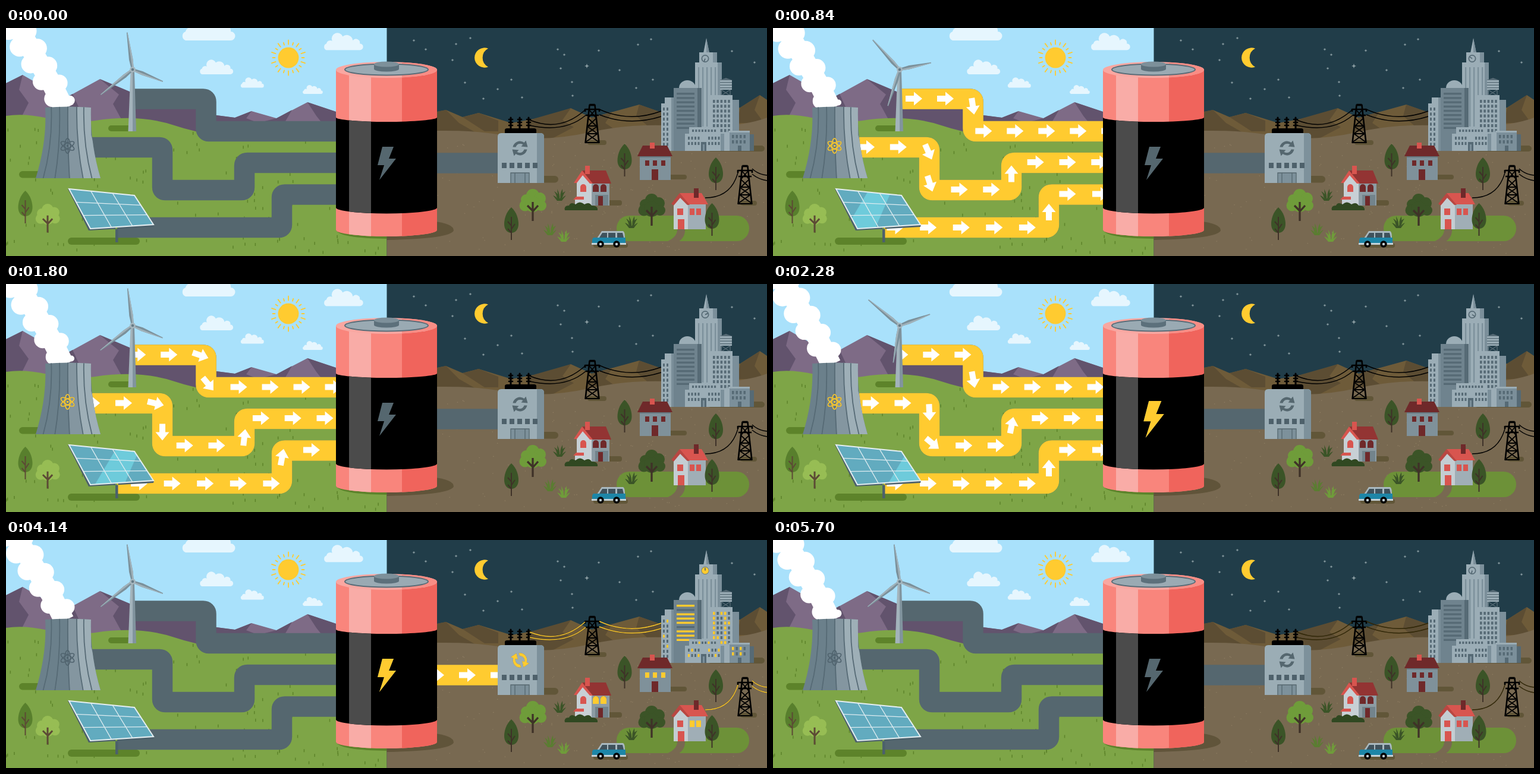
An HTML page that plays this animation: 1280x384 px, repeating every 5.76 s.

```html
<!DOCTYPE html>
<html lang="en">
<head>
<meta charset="utf-8">
<title>Energy storage</title>
<style>
html, body { margin: 0; width: 100%; height: 100%; overflow: hidden; background: #213d49; }
svg { display: block; width: 1280px; height: 384px; }
.pipe { fill: none; stroke: #55676f; stroke-width: 34.5; }
.lit { stroke: #ffcb30; }
.wire { fill: none; stroke: #000; stroke-width: 1.4; }
.wire.lit { stroke: #ffcb30; }
.line { fill: none; stroke: #566a75; stroke-width: 1.8; }
</style>
</head>
<body>
<svg viewBox="0 0 1280 384">
<defs>
  <path id="arrow" fill="#fff" d="M-14-5H0V-11.500L14 0 0 11.500V5H-14Z"/>
  <path id="cloud" fill="#e6f6fe" d="M8 26A8 8 0 0 1 8 11 9 9 0 0 1 21 5 13 13 0 0 1 45-5 14 14 0 0 1 68 4 9 9 0 0 1 84 11 7.5 7.5 0 0 1 84 26Z"/>
  <path id="bolt" d="M-7-28H12L4-8H16L-12 28-4 3H-15Z"/>
  <g id="atom" fill="none" stroke-width="1.6">
    <ellipse rx="12.5" ry="4.6" transform="rotate(30)"/><ellipse rx="12.5" ry="4.6" transform="rotate(90)"/><ellipse rx="12.5" ry="4.6" transform="rotate(150)"/>
    <circle r="1"/>
  </g>
  <g id="half"><path d="M-12-2A12 12 0 0 1 7-9.5L10-13 13-2 2-3 5-6.3A8 8 0 0 0-7-2Z"/></g>
  <g id="swirl"><use href="#half"/><use href="#half" transform="rotate(180)"/></g>
  <g id="pylon" fill="none" stroke="#000">
    <path stroke-width="2.6" d="M-11.500 66-4.500 2H4.500L11.500 66M-12 9H12M-11 19H11M-4.500 1H4.500M-12 8V13M12 8V13"/>
    <path stroke-width="1.800" d="M-5 10 7 24-8 38 9 50-11 64M5 10-7 24 8 38-9 50 11 64M-8 37H8M-10 50H10M-12 65H12"/>
  </g>
  <g id="tuft"><path d="M-9-10Q-2-7-1 2H1Q2-7 10-10 5-3 4 5H-4Q-4-3-9-10ZM-4-14Q1-5 0 4H2Q0-6 5-14 6-2 3 5H-2ZM-11-3Q-4-1-3 5H3Q5-1 11-3 6 3 4 6H-4Z"/></g>
  <clipPath id="towerClip"><path d="M66 134Q104 131 143 134 141 192 159 253H50Q69 192 66 134Z"/></clipPath>
  <clipPath id="panelClip"><path d="M106 271 216 282 248 331 142 338Z"/></clipPath>
  <clipPath id="bodyClip"><path d="M555 71V340A85 11 0 0 0 725 340V71Z"/></clipPath>
  <clipPath id="bandClip"><path d="M555 150.500A85 7.500 0 0 0 725 150.500V302.500A85 10 0 0 1 555 302.500Z"/></clipPath>
  <clipPath id="c0"><path d="M213 90H600V200H213Z"/></clipPath>
  <clipPath id="c1"><path d="M100 170H600V300H100Z"/></clipPath>
  <clipPath id="c2"><path d="M187 250H600V370H187Z"/></clipPath>
  <clipPath id="c3"><path d="M700 200H827V250H700Z"/></clipPath>
</defs>

<!-- day -->
<path fill="#a9e1fb" d="M0 0H641V384H0Z"/>
<use href="#cloud" x="294" y="-5"/>
<use href="#cloud" transform="translate(533 18) scale(.74)"/>
<use href="#cloud" transform="translate(324.500 61.500) scale(.63)"/>
<use href="#cloud" transform="translate(393.500 89) scale(.44)"/>
<use href="#cloud" transform="translate(498 101) scale(.38)"/>
<circle cx="475" cy="50" r="17.500" fill="#ffcb30"/>
<g id="rays" stroke="#ffcb30" stroke-width="1.8" stroke-linecap="round"></g>
<path fill="#7e6b86" d="M0 93 28 79 98 119 158 86 210 108 260 116 319 134 354 147 385 151 413 140 455 152 507 125 555 141V220H0Z"/>
<path fill="#62536d" d="M0 93 28 79 22 104 38 126 26 150H0ZM98 119 112 111 124 137 136 160H80ZM158 86 210 108 260 116 319 134 354 147 385 151 400 192H215L180 128 190 112ZM385 151 413 140 404 152 425 160H370ZM455 152 481 138 470 157H435ZM507 125 555 141V158H530L522 148Z"/>
<path fill="#7ea547" d="M0 148Q30 143 70 152 110 162 150 156 215 146 270 160 330 180 400 190L555 172H641V384H0Z"/>
<g id="ticks" fill="#5d832a"></g>
<g fill="#5d832a">
  <rect x="22" y="241" width="60" height="11.500" rx="5.700"/>
  <rect x="172" y="164" width="46" height="10" rx="5"/>
  <rect x="104" y="353" width="121" height="12" rx="6"/>
</g>

<!-- night -->
<path fill="#213d49" d="M640.500 0H1280V384H640.500Z"/>
<g id="stars" fill="#91a3a8"></g>
<path fill="#ffcb30" d="M811 34.500A16.700 16.700 0 1 0 811 65.500 17.500 17.500 0 0 1 811 34.500Z"/>
<path fill="#6e5b39" d="M700 146 740 138 768 150 795 143 850 160 905 150 950 135 985 151 1065 129 1105 143 1235 134 1268 113 1280 121V220H700Z"/>
<path fill="#5c4d33" d="M700 146 740 138 762 160 790 176H700ZM768 150 795 143 828 156V174H805ZM880 155 950 135 936 155 955 167 915 188H880ZM985 151 1020 141 1008 160 1030 175H975ZM1065 129 1105 143V170H1085L1060 148ZM1235 134 1268 113 1259 138 1275 160H1230Z"/>
<path fill="#786951" d="M640.500 173H725Q780 172 827 179 900 194 980 176 1050 160 1130 165 1230 170 1280 151V384H640.500Z"/>
<g id="dots" fill="#8e7e62"></g>
<path fill="#5c832b" d="M555 340Q560 354 640.500 355V325H555Z"/>
<path fill="#60543a" d="M640.500 325H715Q753 329 753 341 748 355 640.500 357Z"/>
<g fill="#615638">
  <rect x="880" y="249" width="49" height="11.500" rx="5.700"/>
  <rect x="978" y="189" width="32" height="8" rx="4"/>
  <rect x="1100" y="247" width="45" height="8" rx="4"/>
  <rect x="1000" y="290" width="36" height="9" rx="4"/>
  <rect x="1235" y="291" width="28" height="8" rx="4"/>
  <rect x="1180" y="198" width="96" height="10" rx="5"/>
</g>
<rect x="1027" y="316" width="223" height="43" rx="21" fill="#6d9138"/>
<path fill="#786951" d="M1129 338H1142Q1143 352 1131 360H1111Q1130 352 1129 338Z"/>

<!-- pipes -->
<g id="pipes"></g>

<!-- cooling tower -->
<g id="smoke" fill="#fff"></g>
<g clip-path="url(#towerClip)">
  <path fill="#6b808b" d="M40 120H170V260H40Z"/>
  <path fill="#8496a0" d="M104 130H119Q118 195 129 255H107Z"/>
  <path fill="#9eafb7" d="M119 130H143V180L165 255H129Q118 195 119 130Z"/>
  <path class="line" d="M76 130Q79 195 62 255M90 130Q92 195 82 255M104 130Q103 195 107 255M119 130Q118 195 130 255M131 130Q129 195 145 255"/>
</g>
<use href="#atom" x="103.500" y="198.500" stroke="#50636e"/>
<use href="#atom" x="103.500" y="198.500" stroke="#ffcb30" data-on="180,420,2640,2880"/>

<!-- turbine -->
<path fill="#a3b3bb" d="M209.500 74H213V174H205.500Z"/>
<path fill="#81949e" d="M213 74H216L219 174H213Z"/>
<g id="blades"></g>
<circle cx="213" cy="70" r="4.800" fill="#a6b6be"/><circle cx="213" cy="70" r="2.300" fill="#667b86"/>

<!-- solar panel -->
<path fill="#4c606b" d="M184 333H188.500V361H184ZM104 271 139 341 248 335 249 331 142 338 108 271Z"/>
<path fill="#62abbf" d="M106 271 216 282 248 331 142 338Z"/>
<path id="glint" clip-path="url(#panelClip)" fill="#6ecbdb"/>
<path id="cells" fill="none" stroke="#dcebf0" stroke-width="1.300"/>
<path fill="none" stroke="#e4eef1" stroke-width="2" d="M106 271 216 282 248 331 142 338Z"/>

<!-- battery -->
<g clip-path="url(#bodyClip)">
  <path fill="#f9857c" d="M555 60H725V360H555Z"/>
  <path fill="#f9aca7" d="M577 60H614V360H577Z"/>
  <path fill="#f0645c" d="M666 60H725V360H666Z"/>
</g>
<g clip-path="url(#bandClip)">
  <path d="M555 140H725V320H555Z"/><path fill="#4b4b4b" d="M577 140H614V320H577Z"/>
</g>
<ellipse cx="640" cy="70.500" rx="85" ry="13.500" fill="#f9a7a1"/>
<path fill="#f98d85" d="M666 57.700A85 13.500 0 0 1 725 70.500 85 13.500 0 0 1 666 83.300Z"/>
<ellipse cx="640" cy="70" rx="70" ry="9.500" fill="#9aaab3" stroke="#5b6d78" stroke-width="2"/>
<path fill="#5c707b" d="M619 61V69A21 4.500 0 0 0 661 69V61Z"/>
<ellipse cx="640" cy="61" rx="21" ry="4.500" fill="#7d909a"/>
<g id="boltBox"><use href="#bolt" fill="#55676f"/><use href="#bolt" fill="#ffcb30" data-on="2100,2280,5460,5640"/></g>

<!-- converter -->
<path fill="#9badb5" d="M833 177H899Q905 177 905 183V261H827V183Q827 177 833 177Z"/>
<path fill="#7d919b" d="M893 177H899Q905 177 905 183V261H893ZM849 244H880V261H849Z"/>
<path stroke="#55676f" stroke-width="1.300" fill="none" d="M849 261V244H880V261M856 244V261M873 244V261"/>
<path fill="#4e616b" d="M834 227H842V236H834ZM847 227H855V236H847ZM860 227H868V236H860ZM873 227H881V236H873ZM886 227H894V236H886Z"/>
<path d="M839 177V172Q839 169 843 169H888Q892 169 892 172V177Z"/>
<g id="poles" stroke="#000" stroke-linecap="round"></g>
<g id="swirlBox"><use href="#swirl" fill="#55676f"/><use href="#swirl" fill="#ffcb30" data-on="2580,2760,5460,5640"/></g>

<g id="city"></g>
<use href="#pylon" x="986" y="128"/>
<use href="#pylon" x="1243" y="231"/>
<g id="wires"></g>
<g id="village"></g>

<!-- car -->
<rect x="988" y="362" width="58" height="8" rx="4" fill="#615638"/>
<path fill="#a9b9c0" d="M1002 342H1038Q1041 343 1041 354H994Z"/>
<path fill="#3f525c" d="M1003 345H1011V353H998ZM1013 345H1025V353H1013ZM1028 345H1037L1039 353H1028Z"/>
<path fill="#1d86a7" d="M988 353H1042V365H986V356Z"/>
<path fill="#c4d2d8" d="M985 362H1043V365H985Z"/>
<g stroke="#000" stroke-width="3.500" fill="#bfcbd0"><circle cx="1000" cy="364" r="4"/><circle cx="1027" cy="364" r="4"/></g>
</svg>

<script>
const LOOP = 5760, STEP = 60;
const $ = id => document.getElementById(id);
const clamp = (v, a, b) => Math.min(b, Math.max(a, v));
const ramp = (t, a, b) => clamp((t - a) / (b - a), 0, 1);
const mix = (a, b, k) => a.map((v, i) => v + (b[i] - v) * k);
const rep = (n, f) => Array.from({ length: n }, (_, i) => f(i)).join('');
const poly = (fill, d) => `<path fill="${fill}" d="${d}"/>`;
const box = (x, y, w, h, fill, more = '') => `<rect x="${x}" y="${y}" width="${w}" height="${h}" fill="${fill}" ${more}/>`;
const until = on => `data-on="${on},${on + 180},5460,5640"`;
const win = (x, y, w, h, off, on) =>
  box(x, y, w, h, off) + (on ? box(x, y, w, h, '#ffcb30', until(on)) : '');

let seed = 7;
const rnd = () => (seed = seed * 16807 % 2147483647) / 2147483647;

// scenery
$('rays').innerHTML = rep(20, i =>
  `<path d="M0-22.500V${i % 2 ? -26.5 : -29.5}" transform="translate(475 50) rotate(${i * 18})"/>`);
$('ticks').innerHTML = rep(150, () => {
  const x = rnd() * 630, y = 168 + rnd() * 210;
  return `<rect x="${x.toFixed(1)}" y="${y.toFixed(1)}" width="1.5" height="5"/>`;
});
$('dots').innerHTML = rep(230, () =>
  `<circle cx="${(645 + rnd() * 632).toFixed(1)}" cy="${(192 + rnd() * 188).toFixed(1)}" r=".8"/>`);
$('stars').innerHTML = [686,21, 706,36, 757,27, 781,17, 751,54, 772,92, 803,119, 827,103, 850,87, 868,117,
  928,36, 939,45, 933,68, 952,91, 953,114, 977,64, 997,38, 1032,71, 1063,28, 1085,19, 1060,101, 1088,87,
  1221,39, 1259,58].reduce((s, v, i, a) => {
    if (i % 2) return s;
    const r = v === 977 ? 4 : 2.6;
    return s + `<path d="M0-1 .25-.25 1 0 .25.25 0 1-.25.25-1 0-.25-.25Z" transform="translate(${v} ${a[i + 1]}) scale(${r})"/>`;
  }, '');
$('poles').innerHTML = [849, 864, 879].map(x =>
  `<path stroke-width="3" d="M${x} 151V170"/>` +
  rep(3, i => `<path stroke-width="2.6" d="M${x - 3} ${154 + i * 5}h6"/>`)).join('');

const tl = [106, 271], tr = [216, 282], br = [248, 331], bl = [142, 338];
$('cells').setAttribute('d', rep(2, i => {
  const k = (i + 1) / 3;
  return `M${mix(tl, tr, k)}L${mix(bl, br, k)}M${mix(tl, bl, k)}L${mix(tr, br, k)}`;
}));

// pipes: arrow track, visible body (tighter corners), arrow offset s at time `at`, speed v
const pipes = [
  { track: 'M200 119H319.5Q336.5 119 336.5 136V156.5Q336.5 173.5 353.5 173.5H620',
    body: 'M213 119.5H331.5Q336.5 119.5 336.5 124.5V169Q336.5 174 341.5 174H620', gap: 53, s: 37, at: 840, v: .094 },
  { track: 'M120 200.5H246Q263 200.5 263 217.500V255Q263 272 280 272H384Q401 272 401 255V243Q401 226 418 226H620',
    body: 'M130 201H258Q263 201 263 206V268Q263 273 268 273H396Q401 273 401 268V232Q401 227 406 227H620', gap: 53.8, s: 37, at: 840, v: .0427 },
  { track: 'M200 336H447Q464 336 464 319V296.500Q464 279.5 481 279.5H620',
    body: 'M187 336H459Q464 336 464 331V285.5Q464 280.5 469 280.5H620', gap: 55.6, s: 5.5, at: 840, v: 55.6 / 720 },
  { track: 'M690 227.5H860', body: 'M690 227.5H830', gap: 53, s: 33, at: 3120, v: 53 / 510, right: true }
];
$('pipes').innerHTML = pipes.map((p, i) => {
  const on = p.right ? '2460,2640,5460,5640' : '180,420,2640,2880';
  return `<path class="pipe" d="${p.body}"/><g data-on="${on}"><path class="pipe lit" d="${p.body}"/>` +
    `<path id="track${i}" fill="none" d="${p.track}"/><g id="arrows${i}" clip-path="url(#c${i})">` +
    rep(14, () => '<use href="#arrow"/>') + '</g></g>';
}).join('');
pipes.forEach((p, i) => {
  p.path = $('track' + i);
  p.len = p.path.getTotalLength();
  p.arrows = [...$('arrows' + i).children];
});

// wires
const wire = (d, on) => `<path class="wire" d="${d}"/><path class="wire lit" d="${d}" data-on="${on},${on + 180},5460,5760"/>`;
$('wires').innerHTML =
  wire('M881 155Q932 176 974 138M881 164Q940 177 975 147M998 137Q1048 160 1102 140M998 146Q1048 166 1102 149', 2760) +
  wire('M1176 286Q1219 286 1231 244M1255 237Q1266 247 1280 248M1255 246Q1266 255 1280 257', 3180);

// city
const dk = '#566a75', mid = '#7b8f9a', lt = '#9badb6';
const grid = (x, y, cols, rows, dx, dy, w, h, pick) => rep(cols * rows, i =>
  win(x + i % cols * dx, y + (i / cols | 0) * dy, w, h, dk, pick(i)));
$('city').innerHTML =
  poly(lt, 'M1178 17 1183 42H1173Z') + poly(mid, 'M1178 17 1183 42H1178Z') +
  box(1166, 41, 27, 24, lt) + box(1189, 41, 7, 24, mid) +
  box(1159, 58, 38, 149, lt) + box(1197, 58, 7, 149, mid) +
  rep(5, i => box(1164 + i * 7, 66, 2.2, 100, mid)) +
  `<circle cx="1176" cy="51.500" r="6.500" fill="${dk}"/><circle cx="1176" cy="51.500" r="4.800" fill="${lt}"/>` +
  `<circle cx="1176" cy="51.500" r="5.800" fill="#ffcb30" ${until(3480)}/>` +
  `<path id="hand" stroke="#465a65" stroke-width="1.500" d="M1176 51.500V46.700"/>` +
  `<path fill="none" stroke="${dk}" stroke-width="1.400" d="M1203 103V114M1218 103V114M1203 114 1218 104M1218 114 1203 104"/>` +
  box(1201, 88, 20, 16, lt) + poly(dk, 'M1200 88 1211 84 1222 88Z') + rep(3, i => box(1201, 91 + i * 4.5, 20, 1.3, dk)) +
  box(1102, 127, 24, 80, lt) + box(1108, 117, 17, 12, lt) + box(1119, 117, 6, 90, mid) +
  grid(1105, 134, 2, 8, 6, 8.5, 3, 5, i => i % 5 === 1 && 3600) +
  poly(lt, 'M1132 101A14 13 0 0 1 1160 101Z') +
  box(1123, 101, 40, 106, '#6f838e') + box(1163, 101, 7, 106, dk) +
  rep(9, i => win(1128, 109 + i * 7.2, 30, 3.4, dk, i % 4 !== 1 && 3360 + i * 60)) +
  box(1184, 113, 38, 94, lt) + box(1222, 121, 11, 86, mid) +
  grid(1189, 121, 5, 7, 6.3, 8.2, 3.6, 5, i => (i * 7 % 5 < 2 || i % 6 === 2) && 3420 + i * 15) +
  box(1142, 178, 66, 29, lt) + box(1149, 167, 50, 14, lt) + box(1202, 178, 6, 29, mid) +
  grid(1147, 183, 4, 2, 5.5, 9, 3, 5, i => i % 3 === 1 && 3660) +
  grid(1181, 183, 4, 2, 5.5, 9, 3, 5, i => i % 3 === 0 && 3780) +
  grid(1154, 171, 8, 1, 5.3, 8, 3, 4, i => i % 3 === 2 && 3540) +
  box(1169, 192, 9, 15, dk) + box(1172, 196, 3, 11, mid) +
  box(1217, 174, 34, 33, mid) + box(1251, 179, 7, 28, dk) + box(1215, 173, 36, 3, lt) +
  grid(1221, 180, 4, 2, 6.5, 9, 3.5, 5.5, i => i === 3 ? 4500 : i % 2 === 0 && 3720) + box(1231, 198, 6, 9, dk);

// trees and houses
const night = '#3b5427', bark = '#3f3228';
const pine = (x, y, leaf, trunk) => `<g transform="translate(${x} ${y})">` +
  poly(leaf, 'M0 0C9 8 12 20 12 28 12 37 7 43 0 43S-12 37-12 28C-12 20-9 8 0 0Z') +
  `<path fill="none" stroke="${trunk}" stroke-width="2" d="M0 16V55M0 31-6 24M0 37 6 28M0 43-6 36"/></g>`;
const round = (x, y, s, leaf, trunk) => `<g transform="translate(${x} ${y}) scale(${s})"><g fill="${leaf}">` +
  '<circle cy="11" r="11"/><circle cx="-11" cy="18" r="9"/><circle cx="12" cy="16" r="10"/><circle cx="-13" cy="28" r="9.500"/>' +
  '<circle cx="14" cy="28" r="9"/><circle cy="26" r="13"/></g>' +
  `<path fill="none" stroke="${trunk}" stroke-width="3.300" d="M0 22V54M0 37-9 28M0 38 9 28"/></g>`;
const tuft = (x, y, c) => `<use href="#tuft" x="${x}" y="${y}" fill="${c}"/>`;
const arch = (x, y, off, on) => {
  const d = `M${x} ${y + 13}v-8a5 5 0 0 1 10 0v8Z`;
  return poly(off, d) + (on ? `<path fill="#ffcb30" d="${d}" ${until(on)}/>` : '');
};
const red = '#d8554f', dim = '#6f292a';
$('village').innerHTML =
  pine(32.5, 274, '#587f2d', '#5c4a35') + round(70, 296, .9, '#97bd54', '#5c4a35') +
  pine(1040.5, 195, night, bark) + pine(1194, 218, night, bark) +
  // brick house
  box(1066, 214, 52, 42, '#7f919a') + box(1066, 215, 52, 3, '#66767e') +
  poly(dim, 'M1071 198H1112L1121 216H1062Z') + box(1083, 193, 8, 10, red) +
  [1075, 1088, 1102].map((x, i) => win(x, 223, 7, 9, dim, 3240 + i * 60)).join('') +
  box(1086, 238, 11, 18, dim) +
  // arched house
  box(984, 260, 31, 39, '#8d9ca4') + poly('#c8d0d5', 'M960 299V260L970 247 985 262V299Z') +
  poly('#933433', 'M969 240H1009L1018 262H985Z') + poly(red, 'M969 240 955 261H960L970 248 982 262H987Z') +
  box(974, 232, 8, 14, red) + arch(966, 263, red) + arch(987, 263, dim, 3240) + arch(1000, 263, dim, 3300) +
  box(991, 281, 22, 18, '#73848c') + box(996, 283, 8, 16, dim) +
  box(957, 288, 14, 11, '#c8d0d5') + poly(red, 'M959 284H972V289H954Z') +
  poly('#304821', 'M940 307Q938 299 947 299 950 292 958 297 965 290 973 297 981 292 985 299 996 299 995 307Z') +
  round(886, 271, 1, '#6f9c3a', bark) + round(1086, 279, 1, night, bark) +
  // cottage
  box(1145, 296, 32, 43, '#a0aeb6') + poly('#c4cdd2', 'M1123 339V297L1134 285 1147 299V339Z') +
  poly(red, 'M1133 278H1170L1181 297H1147Z') + poly('#b94742', 'M1133 278 1119 296 1123 299 1134 286 1146 298H1150Z') +
  box(1157, 270, 8, 16, dim) + win(1129, 304, 10, 11, red) +
  win(1150, 304, 8, 11, red, 3240) + win(1161, 304, 8, 11, red, 3300) + box(1130, 322, 11, 17, red) +
  pine(850, 302, night, bark) + pine(1187.500, 295, night, bark) +
  tuft(931, 285, night) + tuft(1052, 331, night) + tuft(915, 343, '#5a7d31') + tuft(938, 354, '#6f9c3a');

// moving parts
const fades = [...document.querySelectorAll('[data-on]')].map(el => [el, el.dataset.on.split(',').map(Number)]);

$('blades').innerHTML = rep(3, () => '<g><path fill="#7b909a"/><path fill="#a1b2ba"/></g>');
const blades = [...$('blades').children];
function turbine(t) {
  const spin = 360 * ramp(t, 304, 2540);
  blades.forEach((b, i) => {
    const a = spin - 8.5 + i * 120, l = 62 - 8 * Math.sin(a * Math.PI / 180);
    b.setAttribute('transform', `translate(213 70) rotate(${a})`);
    b.children[0].setAttribute('d', `M-2 0-3.500-17-.8${-l}H.8L3-17 2 0Z`);
    b.children[1].setAttribute('d', `M0 0V${-l}H.8L3-17 2 0Z`);
  });
}

$('smoke').innerHTML = '<path stroke="#fff" stroke-width="34" fill="none" d="M98 136 78 96 47 44 8-20"/>' + rep(14, () => '<circle/>');
const puffs = [...$('smoke').querySelectorAll('circle')];
function smoke(t) {
  const ph = t / 960 % 1 + .2;
  puffs.forEach((c, i) => {
    const side = i % 2 ? -1 : 1, d = ((i >> 1) + (ph + (i % 2) * .5) % 1) * 34 - 2;
    const grow = clamp(d / 18 + .35, .3, 1), off = side * 12;
    c.setAttribute('cx', 100 - .54 * d + off * .86);
    c.setAttribute('cy', 132 - .86 * d - off * .5);
    c.setAttribute('r', grow * (13 + d * .03));
  });
}

function flow(p, t) {
  const run = p.s + (t - p.at) * p.v, first = (run % p.gap + p.gap) % p.gap;
  const front = p.right ? run + p.gap + 1 : p.len;
  p.arrows.forEach((el, i) => {
    const s = first + i * p.gap;
    const show = s < p.len - 1 && s <= front;
    el.style.display = show ? '' : 'none';
    if (!show) return;
    const a = p.path.getPointAtLength(Math.max(0, s - 1)), b = p.path.getPointAtLength(s + 1);
    const c = p.path.getPointAtLength(s), deg = Math.atan2(b.y - a.y, b.x - a.x) * 180 / Math.PI;
    el.setAttribute('transform', `translate(${c.x} ${c.y}) rotate(${deg})`);
  });
}

const sweep = [[240, 70], [840, 160], [1260, 275], [1320, 70], [1800, 187], [2280, 230], [2580, 290]];
function glint(t) {
  const i = sweep.findIndex((k, n) => n && t <= k[0]);
  let x = -99;
  if (i > 0 && t >= sweep[0][0]) {
    const [a, p] = sweep[i - 1], [b, q] = sweep[i];
    x = p + (q - p) * ramp(t, a, b);
  }
  $('glint').setAttribute('d', `M${x + 4} 268h38L${x + 10} 342h-50Z`);
}

function render(t) {
  for (const [el, [a, b, c, d]] of fades) el.style.opacity = ramp(t, a, b) * (1 - ramp(t, c, d));
  turbine(t);
  smoke(t);
  glint(t);
  pipes.forEach(p => flow(p, t));
  const pop = 1 + .11 * ramp(t, 2100, 2280) * (1 - ramp(t, 2280, 2460));
  $('boltBox').setAttribute('transform', `translate(640 228) scale(${pop})`);
  $('swirlBox').setAttribute('transform', `translate(864.5 202.5) rotate(${(clamp(t, 2800, 5680) - 2800) * .1875})`);
  $('hand').setAttribute('transform', `rotate(${200 + t * .125} 1176 51.5)`);
}

const start = performance.now();
function tick() {
  const t = (performance.now() - start) % LOOP;
  render(Math.floor(t / STEP) * STEP);
  requestAnimationFrame(tick);
}
tick();
</script>
</body>
</html>
```
